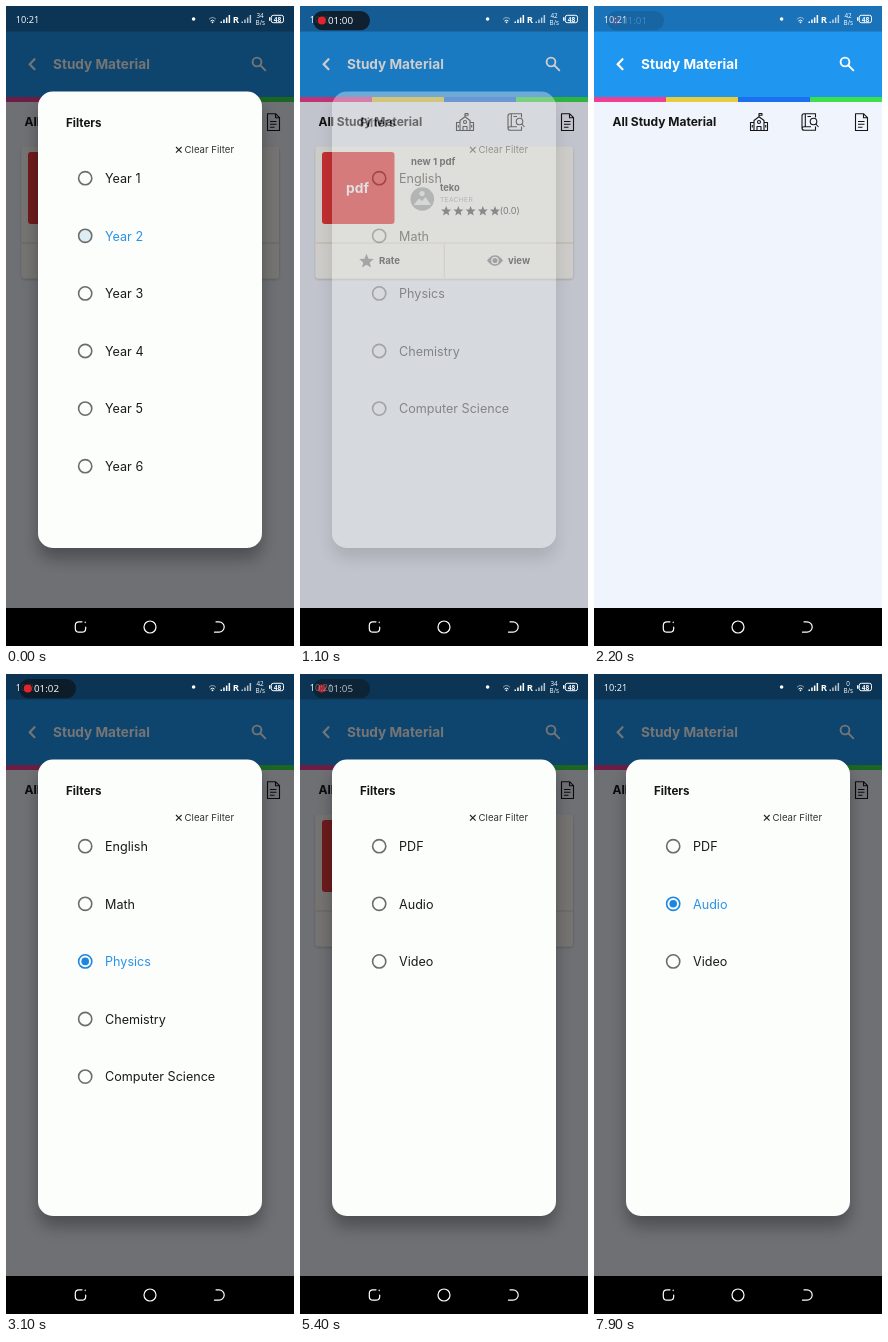
These frames come from a looping animation (288 by 640 pixels, 8 s). An HTML page:

```html
<!DOCTYPE html>
<html lang="en">
<head>
<meta charset="utf-8">
<title>Study material filters</title>
<style>
  html, body { margin: 0; width: 100%; height: 100%; overflow: hidden; background: #000; }
  svg { display: block; width: 100%; height: 100%; font-family: Inter, "Open Sans", sans-serif; }
  .bold { font-weight: 700; }
  .line { fill: none; stroke: #151515; stroke-width: 1.1; stroke-linejoin: round; }
  .white { fill: none; stroke: #fff; stroke-linecap: round; }
  .row { font-size: 12.6px; }
  .status { font-family: "Open Sans", "Noto Sans", sans-serif; fill: #fff; }
</style>
</head>
<body>
<svg viewBox="0 0 288 640">
  <defs>
    <path id="star" d="M0-5 1.4-1.6 5-1.4 2.2 1 3.1 4.5 0 2.6-3.1 4.5-2.2 1-5-1.4-1.4-1.6Z"/>
    <path id="bars" d="M0 8.5v-1.5h1.5v1.5zM2.7 8.5v-3.5h1.5v3.5zM5.4 8.5v-5.5h1.5v5.5zM8.1 8.5v-8h1.5v8z"/>
    <filter id="lift" x="-20%" y="-10%" width="140%" height="125%">
      <feDropShadow dx="0" dy="11" stdDeviation="8" flood-opacity=".3"/>
    </filter>
    <filter id="edge"><feDropShadow dx="0" dy="1" stdDeviation="1" flood-opacity=".22"/></filter>
  </defs>

  <rect width="288" height="602" fill="#f0f4fd"/>
  <rect width="288" height="92" fill="#1f96f0"/>
  <rect width="288" height="25.5" fill="#1a72b8"/>
  <g id="strip"></g>
  <path class="white" d="M28.5 53.2 23.7 58.2 28.5 63.2" stroke-width="2.2"/>
  <text class="bold" x="47" y="63" font-size="13.6" fill="#fff">Study Material</text>
  <g class="white" stroke-width="1.9"><circle cx="251" cy="56" r="4.4"/><path d="M254.5 59.5 259.3 64.3"/></g>

  <text class="bold" x="18.5" y="120.3" font-size="12" fill="#151515">All Study Material</text>
  <g class="line">
    <path d="M156.5 124.5V116.5H160V114.5L165 110.8 170 114.5V116.5H173.5V124.5ZM160 116.5V124.5M170 116.5V124.5M165 110.8V107.5H168V109.3H165M163 124.5V120.5H167V124.5M158.3 119V121.5M171.7 119V121.5"/>
    <circle cx="165" cy="116" r="1.5"/>
    <path d="M221.5 111.5V107.8H210Q208 107.8 208 110V122Q208 124.3 210.3 124.3H221.5V120.5M211.3 107.8V120.8M208 122.5Q208 120.8 210.3 120.8H217M213.5 110.5H217M221.8 118 224.5 121"/>
    <circle cx="219.5" cy="115.5" r="3.3"/>
    <path d="M261.5 107.7H269.5L273.5 111.7V124.5H261.5ZM269.5 107.7V111.7H273.5M264 115.5H270.5M264 118.3H270.5M264 121.2H268.5"/>
  </g>

  <g id="card" fill="#3a3a3a">
    <rect x="15.5" y="140.5" width="257.5" height="132" rx="3" fill="#fffdf9" filter="url(#edge)"/>
    <path d="M16 237H273M144.3 237V272" stroke="#e5dccb" stroke-width="1"/>
    <rect x="22" y="146" width="72.5" height="72" rx="3" fill="#f03a3d"/>
    <text class="bold" x="46" y="187" font-size="13.8" fill="#fff">pdf</text>
    <g class="bold" font-size="9.6">
      <text x="111" y="159.3">new 1 pdf</text>
      <text x="140" y="185.3" font-size="9.3">teko</text>
      <text x="79" y="258.3">Rate</text>
      <text x="208" y="258.3">view</text>
    </g>
    <circle cx="122.3" cy="193" r="11.8" fill="#a9acae"/>
    <path d="M113.5 199 119 192.5 122 195 125.5 191 131 199Z" fill="#eceeee"/>
    <circle cx="122" cy="187.5" r="2.6" fill="#eceeee"/>
    <text x="140" y="195.6" font-size="6.7" letter-spacing=".3" fill="#aaa">TEACHER</text>
    <g id="stars" fill="#555"></g>
    <text x="199.7" y="208.3" font-size="9">(0.0)</text>
    <use href="#star" transform="translate(66.5 255) scale(1.45)" fill="#8c8c8c"/>
    <path d="M187 254.5Q195 244 203 254.5Q195 265 187 254.5Z" fill="#858585"/>
    <circle cx="195" cy="254.5" r="3.2" fill="#858585" stroke="#fff" stroke-width="1.3"/>
  </g>

  <rect id="scrim" width="288" height="602"/>
  <g id="dialog">
    <rect x="32" y="85.5" width="224" height="456.5" rx="15" fill="#fcfefc" filter="url(#lift)"/>
    <text class="bold" x="60" y="121.3" font-size="11.6" fill="#151515">Filters</text>
    <path d="M170 141 175.6 146.6M175.6 141 170 146.6" stroke="#222" stroke-width="1.1"/>
    <text x="178.6" y="147.3" font-size="9.6" fill="#333">Clear Filter</text>
    <g id="rows"></g>
  </g>

  <g class="status">
    <text x="9.7" y="16.6" font-size="9.2">10:21</text>
    <circle cx="187.6" cy="13" r="1.8"/>
    <g class="white" stroke-width="1"><path d="M203.3 13Q206.5 9.8 209.7 13" opacity=".55"/><path d="M204.8 14.8Q206.5 13.2 208.2 14.8"/></g>
    <circle cx="206.5" cy="16.3" r=".9"/>
    <use href="#bars" x="214.5" y="8.5"/>
    <text class="bold" x="226.7" y="16.9" font-size="9.5">R</text>
    <use href="#bars" x="235.5" y="8.5" opacity=".7"/>
    <g font-size="6.3" text-anchor="middle"><text id="rate" x="254" y="11.8"></text><text x="254.3" y="18.6">B/s</text></g>
    <rect x="265.3" y="9.3" width="12.2" height="7.4" rx="2" fill="none" stroke="#fff"/>
    <path d="M263 11.3h1.5v3.4h-1.5z"/>
    <text class="bold" x="271.4" y="15.6" font-size="6.6" text-anchor="middle">48</text>
  </g>
  <g id="pill">
    <rect x="13" y="5" width="57" height="19.3" rx="9.6" fill="#0e1a24" opacity=".88"/>
    <circle cx="21.8" cy="14.5" r="4" fill="#e0262b"/>
    <text class="status" id="clock" x="28" y="18" font-size="9.8"></text>
  </g>

  <rect y="602" width="288" height="38"/>
  <g class="white" stroke-width="1.2">
    <path d="M76 615.8H73Q69.3 615.8 69.3 619.5V622.5Q69.3 626.2 73 626.2H76Q79.7 626.2 79.7 622.5V621M79.2 616V616.6"/>
    <circle cx="144" cy="621" r="6"/>
    <path d="M210 615.8H213A5.2 5.2 0 0 1 213 626.2H208.5"/>
  </g>
</svg>
<script>
const LOOP = 8000, FADE = 150;
const $ = id => document.getElementById(id);
const clamp = v => Math.max(0, Math.min(1, v));

const years = [1, 2, 3, 4, 5, 6].map(n => "Year " + n);
const subjects = ["English", "Math", "Physics", "Chemistry", "Computer Science"];
const types = ["PDF", "Audio", "Video"];

// open and close: start of each fade; tap: when the picked option is pressed
const visits = [
  { items: years, pick: 1, open: -1000, tap: -60, close: 350 },
  { items: subjects, pick: 2, open: 1046, tap: 1500, close: 1800 },
  { items: subjects, pick: 2, open: 2600, tap: 0, close: 3600 },
  { items: types, pick: 1, open: 4900, tap: 5900, close: 6200 },
  { items: types, pick: 1, open: 7300, tap: 0, close: 9000 }
];

$("strip").innerHTML = ["#ee3f92", "#e6cc3e", "#1b70f0", "#3be04c"]
  .map((c, i) => `<rect x="${i * 72}" y="91" width="72" height="5" fill="${c}"/>`).join("");
$("stars").innerHTML = [0, 1, 2, 3, 4]
  .map(i => `<use href="#star" x="${146.2 + i * 12.2}" y="205"/>`).join("");

function row(label, i, picked, age) {
  const y = 172.2 + i * 57.6;
  const checked = picked && age > 120;
  const ring = checked ? "#1c86e0" : "#6c6c6c";
  const fill = picked && !checked ? "#deedf4" : "none";
  const dot = checked ? 3.8 * clamp((age - 120) / 100) : 0;
  return `<circle cx="79.2" cy="${y}" r="6.6" fill="${fill}" stroke="${ring}" stroke-width="1.6"/>
    <circle cx="79.2" cy="${y}" r="${dot}" fill="${ring}"/>
    <text class="row" x="99" y="${y + 4.7}" fill="${picked ? "#2b93e6" : "#1a1a1a"}">${label}</text>`;
}

function draw(t) {
  const visit = visits.find(v => t >= v.open && t < v.close + FADE);
  const shown = visit ? clamp((t - visit.open) / FADE) * clamp(1 - (t - visit.close) / FADE) : 0;
  $("scrim").setAttribute("opacity", .54 * shown);
  $("dialog").setAttribute("opacity", shown);
  $("rows").innerHTML = visit
    ? visit.items.map((s, i) => row(s, i, i === visit.pick && t >= visit.tap, t - visit.tap)).join("")
    : "";

  const listed = t < 1800 || (t >= 3600 && t < 6200);
  $("card").setAttribute("visibility", listed ? "visible" : "hidden");

  $("rate").textContent = [34, 42, 34, 0][Math.floor((t + 2000) / 3000)];

  // the recording badge breathes every two seconds
  const beat = t % 2000;
  $("pill").setAttribute("opacity", clamp((beat - 120) / 500) * clamp((1750 - beat) / 500));
  const seconds = Math.floor(59.7 + t / 1000);
  $("clock").textContent = `0${Math.floor(seconds / 60)}:${String(seconds % 60).padStart(2, "0")}`;
}

const start = performance.now();
function tick() {
  draw((performance.now() - start) % LOOP);
  requestAnimationFrame(tick);
}
tick();
</script>
</body>
</html>
```
